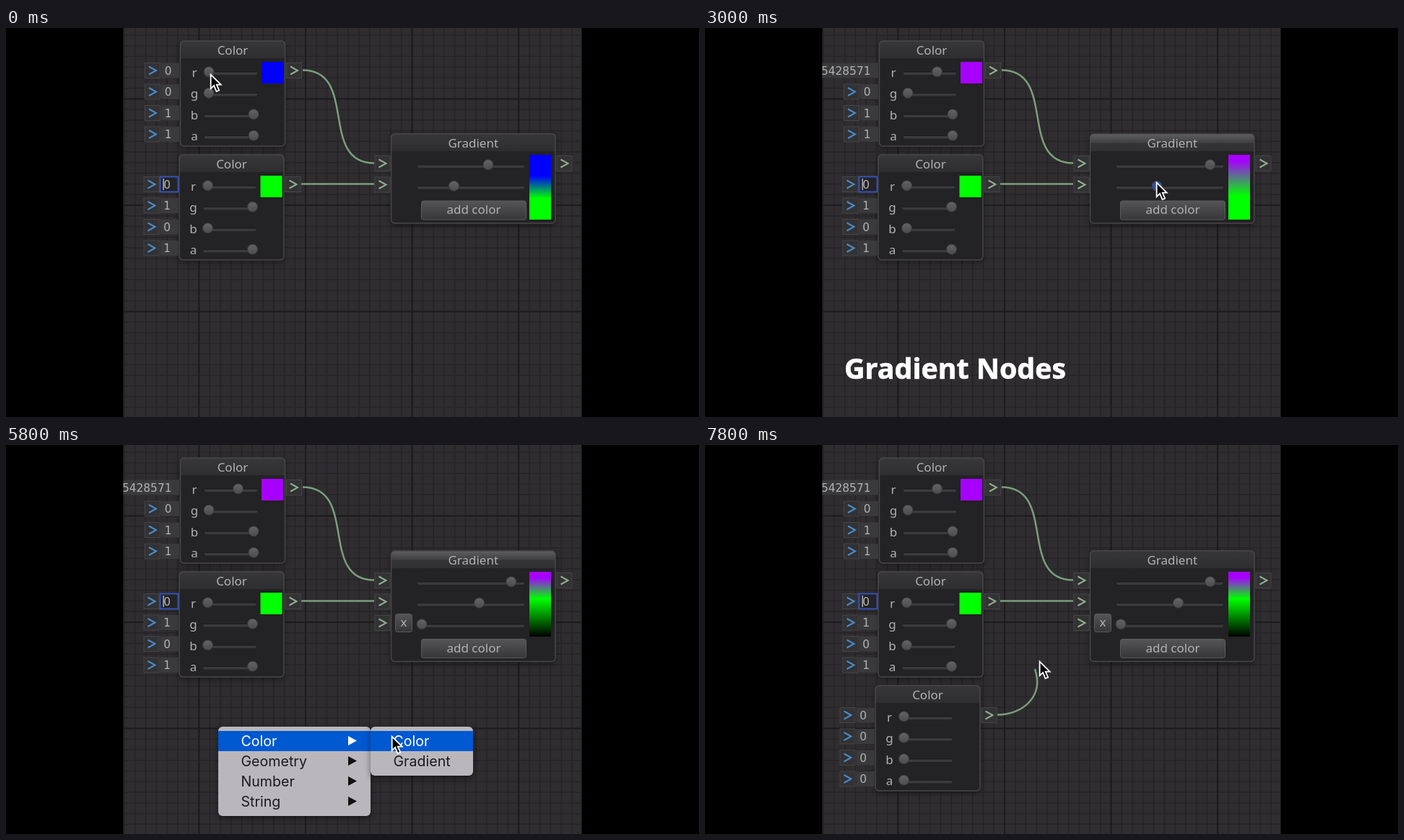
Animation, 960 px wide and 540 px high, one loop 8 s. Source, as an HTML page:

```html
<!DOCTYPE html>
<html lang="en">
<head>
<meta charset="utf-8">
<title>Gradient Nodes</title>
<style>
html, body { margin: 0; width: 100%; height: 100%; overflow: hidden; background: #000; }
svg { display: block; }
#stage { width: 960px; height: 540px; }
text { font: 17px "Noto Sans", "Open Sans", sans-serif; fill: #b2b2b3; }
.mid { text-anchor: middle; }
.num { font: 15.4px "DejaVu Sans", sans-serif; text-anchor: end; }
.menu text { font: 19.6px Inter, Roboto, sans-serif; fill: #1b1b1d; }
.menu .on { fill: #fff; }
.menu path { fill: #111; }
.title { font: 700 39.4px "Open Sans", "Noto Sans", sans-serif; fill: #fff; stroke: #fff; stroke-width: .7; }
.node { filter: drop-shadow(0 3px 4px rgba(0, 0, 0, .45)); }
.wire { fill: none; stroke: #7a9f7c; stroke-width: 2.5; }
</style>
</head>
<body>
<svg id="stage" viewBox="0 0 960 540">
  <defs>
    <linearGradient id="bar" x2="0" y2="1"><stop stop-color="#373638"/><stop offset="1" stop-color="#2e2d2f"/></linearGradient>
    <linearGradient id="barOn" x2="0" y2="1"><stop stop-color="#605f61"/><stop offset=".5" stop-color="#403f41"/><stop offset=".55" stop-color="#343335"/><stop offset="1" stop-color="#313032"/></linearGradient>
    <linearGradient id="button" x2="0" y2="1"><stop stop-color="#555456"/><stop offset="1" stop-color="#363537"/></linearGradient>
    <linearGradient id="knob" x2="0" y2="1"><stop stop-color="#646365"/><stop offset="1" stop-color="#4c4b4d"/></linearGradient>
  </defs>
  <rect width="960" height="540"/>
  <svg x="162.5" width="635" height="540" viewBox="162.5 0 635 540">
    <rect x="162" width="636" height="540" fill="#2f2d2f"/>
    <path id="minor" stroke="#252326" stroke-width="1.3"/>
    <path id="major" stroke="#1c1b1d" stroke-width="2"/>
    <g id="scene"></g>
  </svg>
</svg>
<script>
const LOOP = 8000, STEP = 200, ROW = 29.5;
const scene = document.getElementById('scene');

// Keyframes are [time, ...values], interpolated linearly.
const cursorKeys = [
  [200, 283, 64], [1000, 317, 63], [1400, 321, 63], [1600, 420, 98], [1800, 590, 168],
  [2000, 668, 187], [2400, 700, 187], [2600, 680, 200], [2800, 621, 214], [3000, 625, 214],
  [3400, 655, 215], [3800, 648, 250], [4200, 641, 253], [4400, 635, 258], [4600, 450, 335],
  [4800, 294, 392], [5000, 294, 392], [5200, 332, 407], [5400, 450, 409], [5800, 534, 404],
  [6000, 537, 406], [6400, 379, 363], [7000, 317, 350], [7200, 318, 337], [7400, 320, 335],
  [7600, 393, 372], [7800, 463, 300]
];
const redKeys = [[200, 0], [1000, 195 / 350], [1400, 229 / 350]];
const topStopKeys = [[2000, .676], [2400, .91]];
const lowStopKeys = [[2800, .327], [3000, .368], [3400, .585]];
const newNodeKeys = [[6400, 295, 362], [7000, 233, 350], [7200, 234, 336], [7400, 236, 334]];

function at(keys, t) {
  const next = keys.findIndex(k => k[0] > t);
  if (next === 0) return keys[0].slice(1);
  if (next < 0) return keys[keys.length - 1].slice(1);
  const a = keys[next - 1], b = keys[next], p = (t - a[0]) / (b[0] - a[0]);
  return a.slice(1).map((v, i) => v + (b[i + 1] - v) * p);
}
const clamp = v => Math.max(0, Math.min(1, v));
const within = (t, from, to) => t >= from && t <= to;
const rect = (x, y, w, h, fill, extra = '') =>
  `<rect x="${x}" y="${y}" width="${w}" height="${h}" fill="${fill}" ${extra}/>`;
const label = (x, y, str, cls = 'mid') => `<text x="${x}" y="${y}" class="${cls}">${str}</text>`;

function drawGrid(id, pitch) {
  let d = '';
  for (let x = 267.4 % pitch; x < 800; x += pitch) d += `M${x} 0V540`;
  for (let y = 98.4 % pitch; y < 540; y += pitch) d += `M162 ${y}H798`;
  document.getElementById(id).setAttribute('d', d);
}

function socket(x, y, color) {
  return rect(x - 10.5, y - 10.5, 21, 21, '#333234', 'stroke="#454446"') +
    `<path d="M${x - 5} ${y - 5.5}L${x + 5} ${y}L${x - 5} ${y + 5.5}" fill="none" stroke="${color}" stroke-width="2"/>`;
}
const greenSocket = (x, y) => socket(x, y, '#8fae8f');

function slider(x, y, width, range, value, active) {
  const fill = active ? '#34509f' : 'url(#knob)';
  return rect(x, y + 1, width, 5, '#3b3a3c', 'rx="2.5"') + rect(x, y + 1, width, 1.5, '#1c1b1d', 'rx=".7"') +
    `<circle cx="${x + 6 + range * value}" cy="${y + 1.8}" r="7" fill="${fill}" stroke="#3a393b"/>`;
}

function panel(x, y, w, h, name, focused) {
  return `<g class="node">${rect(x, y, w, h, '#232224', 'rx="5"')}</g>` +
    `<path d="M${x} ${y + 24}V${y + 5}q0-5 5-5H${x + w - 5}q5 0 5 5V${y + 24}Z" fill="url(#${focused ? 'barOn' : 'bar'})"/>` +
    rect(x, y, w, h, 'none', 'rx="5" stroke="#484749" stroke-width="1.5"') +
    label(x + w / 2, y + 19, name);
}

function field(x, y, value, editing) {
  const str = String(+value.toFixed(8));
  const width = Math.max(25, str.length * 9.8 + 14), left = x - 1.5 - width;
  return socket(left - 12, y, '#4a8bc9') +
    rect(left, y - 10.5, width, 21, editing ? '#242326' : '#3a393b', editing ? 'stroke="#3553b4" stroke-width="2"' : '') +
    label(x - 12, y + 5.6, str, 'num') +
    (editing ? rect(left + 4, y - 8, 1.3, 16, '#c8c8c8') : '');
}

function colorNode(x, y, rgba, { focused, dragging, editing } = {}) {
  let out = panel(x, y, 145, 146, 'Color', focused);
  rgba.forEach((v, i) => {
    const rowY = y + 41 + i * ROW;
    out += field(x, rowY, v, editing && i === 0) + label(x + 19.5, rowY + 8.5, 'rgba'[i]) +
      slider(x + 33.5, rowY, 73, 62, v, dragging && i === 0);
  });
  if (rgba[3]) out += rect(x + 112.5, y + 29, 30, 30, css(rgba));
  return out + greenSocket(x + 157.5, y + 41);
}
const css = c => `rgb(${c.slice(0, 3).map(v => Math.round(v * 255))})`;

function gradientNode(x, y, stops, focused, dragged) {
  const extra = (stops.length - 2) * ROW, buttonY = y + 93 + extra;
  const ramp = stops.map(s => `<stop offset="${1 - s.pos}" stop-color="${css(s.color)}"/>`).join('');
  let out = `<linearGradient id="ramp" x2="0" y2="1">${ramp}</linearGradient>` +
    panel(x, y, 227.5, 124 + extra, 'Gradient', focused);
  stops.forEach((s, i) => {
    const rowY = y + 41 + i * ROW;
    out += greenSocket(x - 12, rowY) + slider(x + 36.5, rowY, 148, 136, s.pos, dragged === i);
    if (i > 1) out += rect(x + 6, rowY - 12.5, 23, 25, 'url(#button)', 'rx="3" stroke="#59585a"') + label(x + 17.5, rowY + 5, 'x');
  });
  return out + rect(x + 191.5, y + 29, 30, 90, 'url(#ramp)') +
    rect(x + 42, buttonY, 145, 26, 'url(#button)', 'rx="3" stroke="#5c5b5d"') +
    label(x + 114.5, buttonY + 18, 'add color') + greenSocket(x + 240, y + 41);
}

function menu(x, y, w, items, active, nested) {
  let out = `<g class="menu node">` + rect(x, y, w, 12 + items.length * 28, '#b9b7bb', 'rx="6"');
  items.forEach((name, i) => {
    const on = i === active, top = y + 6 + i * 28, cls = on ? 'on' : '';
    if (on) out += rect(x, top, w, 28, '#0059d1');
    out += label(x + 31.5, top + 20.5, name, cls);
    if (nested) out += `<path class="${cls}" d="M${x + 180} ${top + 7}l12 6.5l-12 6.5z"/>`;
  });
  return out + '</g>';
}

function title(t) {
  if (t < 200 || t > 3600) return '';
  const letters = [...'Gradient Nodes'].map((ch, i) => {
    const shown = clamp((t - 200 - i * 42) / 300), gone = clamp((t - 3100 - i * 20) / 200);
    const alpha = shown * (1 - gone);
    return `<tspan fill-opacity="${alpha}" stroke-opacity="${alpha}">${ch}</tspan>`;
  }).join('');
  return label(179.5 + t * .0045, 486.5, letters, 'title');
}

function cursor(t) {
  const [x, y] = at(cursorKeys, t);
  return `<path transform="translate(${x} ${y - .7}) scale(.95)" d="M.7 1.5V22L5.4 17.5L9 26L12.8 24.4L9.2 16.2H15.5Z" fill="#000" stroke="#fff" stroke-width="1.9"/>`;
}

function render(t) {
  const red = Math.round(at(redKeys, t)[0] * 350) / 350;
  const first = [red, 0, 1, 1], second = [0, 1, 0, 1];
  const stops = [
    { pos: at(topStopKeys, t)[0], color: first },
    { pos: at(lowStopKeys, t)[0], color: second }
  ];
  if (t >= 4200) stops.push({ pos: 0, color: [0, 0, 0] });
  const dragged = within(t, 2000, 2400) ? 0 : within(t, 2800, 3400) ? 1 : -1;

  let out = colorNode(241.5, 18, first, { focused: within(t, 200, 1600), dragging: within(t, 200, 1400) }) +
    colorNode(240, 176, second, { editing: true }) +
    gradientNode(533.5, 147, stops, within(t, 2000, 6400), dragged) +
    '<path class="wire" d="M411 58.5C488 58.5 433 187.5 510 187.5M409 216.5H510"/>';
  if (t >= 6200) {
    const [x, y] = at(newNodeKeys, t);
    out += colorNode(x, y, [0, 0, 0, 0], { focused: within(t, 6400, 7200) });
  }
  if (t >= 7800) out += '<path class="wire" d="M405 374.5C440 374.5 470 349 457 311"/>';
  if (within(t, 5000, 6000)) {
    out += menu(294, 391, 211, ['Color', 'Geometry', 'Number', 'String'], t >= 5200 ? 0 : -1, true);
    if (t >= 5400) out += menu(505, 391, 142, ['Color', 'Gradient'], t >= 5600 ? 0 : -1);
  }
  return out + title(t) + cursor(t);
}

drawGrid('minor', 14.76);
drawGrid('major', 147.6);

let shown = -1;
function tick() {
  const t = Math.floor(performance.now() % LOOP / STEP) * STEP;
  if (t !== shown) scene.innerHTML = render(shown = t);
  requestAnimationFrame(tick);
}
tick();
</script>
</body>
</html>
```
